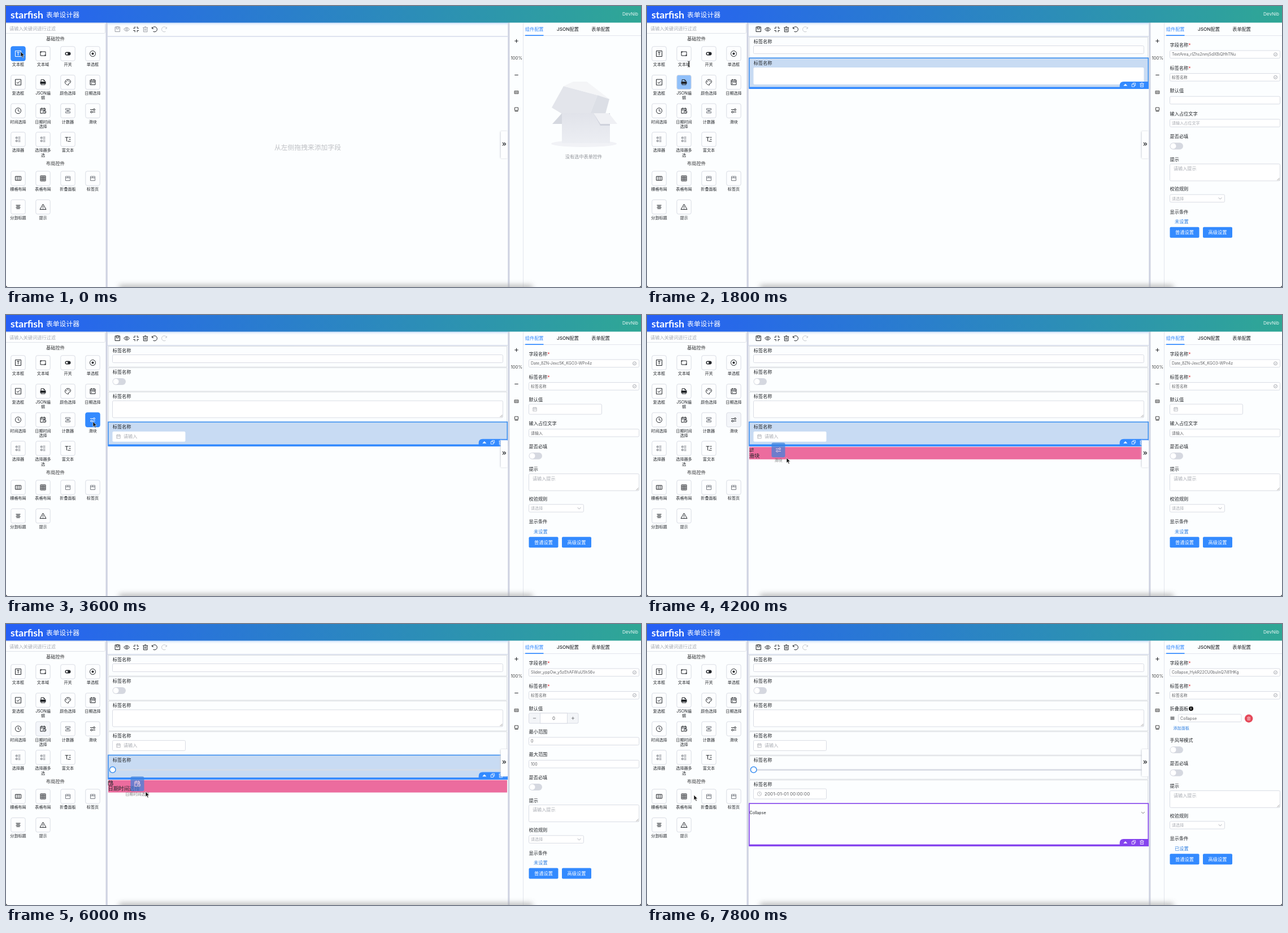
Write an HTML page that moves like this. It is 1124 px wide and 498 px high and loops after 8 s.

```html
<!DOCTYPE html>
<html lang="en">
<head>
<meta charset="utf-8">
<title>starfish</title>
<style>
html, body { margin: 0; width: 100%; height: 100%; overflow: hidden; background: #fcfeff; }
svg { display: block; }
text { font-family: Inter, "Noto Sans CJK SC", "Noto Sans CJK", sans-serif; white-space: pre; }
.brand { font-family: Lato, sans-serif; font-weight: 700; }
</style>
</head>
<body>
<svg id="stage" width="1124" height="498" viewBox="0 0 1124 498">
  <defs>
    <linearGradient id="head"><stop offset="0" stop-color="#265ff6"/><stop offset="1" stop-color="#2fa795"/></linearGradient>
    <linearGradient id="glow" x2="0" y2="1"><stop offset="0" stop-color="#bcd6f7"/><stop offset="1" stop-color="#fcfeff" stop-opacity="0"/></linearGradient>
    <linearGradient id="carton" x2="0" y2="1"><stop offset="0" stop-color="#e1e3ea"/><stop offset="1" stop-color="#eceef3"/></linearGradient>
    <filter id="blur" x="-10%" y="-300%" width="120%" height="700%"><feGaussianBlur stdDeviation="5"/></filter>
    <filter id="soft" x="-50%" width="200%"><feGaussianBlur stdDeviation="1.5"/></filter>
  </defs>
  <g id="base"></g>
  <g id="live"></g>
</svg>
<script>
const BLUE = '#338aff', PURPLE = '#8544ee', INK = '#222529', GREY = '#a8abb2', LINE = '#d9dce4';

// drawing helpers
const rect = (x, y, w, h, fill, stroke = 'none', r = 0, sw = 1, more = '') =>
  `<rect x="${x}" y="${y}" width="${w}" height="${h}" rx="${r}" fill="${fill}" stroke="${stroke}" stroke-width="${sw}" ${more}/>`;
const text = (x, y, s, size = 8.2, fill = INK, more = '') =>
  `<text x="${x}" y="${y + size * 0.37}" font-size="${size}" fill="${fill}" ${more}>${s}</text>`;
const mid = 'text-anchor="middle"', medium = 'font-weight="500"';
const path = (d, fill, stroke = 'none', sw = 1, more = '') =>
  `<path d="${d}" fill="${fill}" stroke="${stroke}" stroke-width="${sw}" ${more}/>`;
const circle = (x, y, r, fill, stroke = 'none', sw = 1) =>
  `<circle cx="${x}" cy="${y}" r="${r}" fill="${fill}" stroke="${stroke}" stroke-width="${sw}"/>`;
const ring = (x, y, r) => `M${x - r} ${y}a${r} ${r} 0 1 0 ${2 * r} 0a${r} ${r} 0 1 0 ${-2 * r} 0`;
const box = (x, y, w, h) => `M${x} ${y}h${w}v${h}h${-w}z`;

// icons around 0,0: [stroked path, filled path]
const list = [box(-4, -4, 2.5, 2.5) + box(-4, 1.5, 2.5, 2.5) + 'M0-4H4M0-1.5H4M0 1.5H4M0 4H4', ''];
const day = box(-4.5, -4, 9, 8.5) + 'M-4.5-1.5H4.5M-2-5.5V-3M2-5.5V-3';
const pane = 'M-4-3.5H4V4H-4zM-4-1H4M0-3.5V-1';
const icons = {
  input: [box(-5, -5, 10, 10) + 'M-2.5-2.5H2.5M0-2.5V3', ''],
  area: [box(-4.5, -3.5, 9, 7), box(-5, -4, 2, 2) + box(3, 2, 2, 2)],
  toggle: ['', 'M-2-3H2a3 3 0 0 1 0 6H-2a3 3 0 0 1 0-6z' + ring(-1.8, 0, 1.8)],
  radio: [ring(0, 0, 5), ring(0, 0, 2)],
  check: [box(-5, -5, 10, 10) + 'M-2.5 0L-.5 2L3-2', ''],
  json: ['M-3.5-1V-4.5H1.5L3.5-2V-1M-3.5 2V4.5H3.5V2', box(-5, -1.2, 10, 4) + 'M1-5L4-2H1z'],
  palette: ['M1 5C-2 5-5 3-5 0C-5-3-2-5 0-5C3-5 5-3 5-1C5 2 2 1 1.5 2.5Z', ring(-2.5, -1, .8) + ring(0, -3, .8) + ring(2.5, -1.5, .8)],
  date: [day, box(-3, 0, 1.5, 1) + box(-.5, 0, 1.5, 1) + box(2, 0, 1.5, 1) + box(-3, 2, 1.5, 1)],
  clock: [ring(0, 0, 5) + 'M0-3V0L2.5 1.5', ''],
  datetime: ['M0 4.5H-4.5V-4H4V-1M-4.5-1.5H4M-2-5.5V-3M2-5.5V-3M2.5 1V2.5H4' + ring(2.6, 2.2, 2.6), ''],
  counter: [box(-4, -4, 8, 2.5) + box(-4, 1.5, 8, 2.5) + 'M0-1.5V1.5M-2 0H2', ''],
  slider: ['M-4.5-2H1M4-2H4.5M-4.5 2.2H-3.5M0 2.2H4.5' + ring(2.5, -2, 1.5) + ring(-2, 2.2, 1.5), ''],
  select: list, multi: list,
  rich: ['M-5-3.5H1M-2-3.5V3.5M2-3.5H5M2 0H5M-.5 3.5H5', ''],
  grid: [box(-5, -3.5, 10, 7) + 'M-1.7-3.5V3.5M1.7-3.5V3.5', ''],
  table: [box(-4.5, -4.5, 9, 9) + 'M-1.5-4.5V4.5M1.5-4.5V4.5M-4.5-1.5H4.5M-4.5 1.5H4.5', ''],
  fold: [pane, ''], tabs: [pane, ''],
  split: ['M-4-3H4M-3-1H3M-4 1H4M-3 3H3', ''],
  warn: ['M0-5L5.5 4.5H-5.5zM0-1.5V1.5M0 2.6V3.6', ''],
  save: [box(-4.2, -4.2, 8.4, 8.4) + box(-2, -4.2, 4, 3.5), ''],
  eye: ['M-5 0Q0-6.5 5 0Q0 6.5-5 0z' + ring(0, 0, 1.6), ''],
  shrink: ['M-5-2H-2V-5M5-2H2V-5M-5 2H-2V5M5 2H2V5', ''],
  trash: ['M-4.5-3H4.5M-1.5-4.5H1.5M-3.3-3V4.5H3.3V-3M-1-1V2.5M1-1V2.5', ''],
  undo: ['M-4.5-4V-1.2H-1.7M-4.3-1.5A4.5 4.5 0 1 1-2.5 3.8', ''],
  redo: ['M4.5-4V-1.2H1.7M4.3-1.5A4.5 4.5 0 1 0 2.5 3.8', ''],
  copy: ['M-1.5-1.5V-4H4V1.5H1.5' + box(-4, -1.5, 5.5, 5.5), ''],
  up: ['', 'M-4 2L0-2L4 2z'], down: ['', 'M-4-2L0 2L4-2z'],
  keys: [box(-3.5, -2.5, 7, 5) + 'M-3.5-.8H3.5M-3.5 .9H3.5', ''],
  screen: [box(-3, -3, 6, 5) + 'M-3 3.5H3', ''],
  chevron: ['M-2.8-1.4L0 1.4L2.8-1.4', ''],
  tick: [ring(0, 0, 3) + 'M-1.4 0L-.3 1L1.5-.9', ''],
  plus: ['M-3.2 0H3.2M0-3.2V3.2', ''], minus: ['M-3.2 0H3.2', '']
};
const icon = (name, x, y, color = INK, k = 1) => {
  const [line, solid] = icons[name];
  return `<g transform="translate(${x} ${y}) scale(${k})">` +
    path(line, 'none', color, 1) + path(solid, color, 'none', 0, 'fill-rule="evenodd"') + '</g>';
};

// palette tiles
const groups = [
  [84.5, [['input', '文本框'], ['area', '文本域'], ['toggle', '开关'], ['radio', '单选框'],
    ['check', '复选框'], ['json', 'JSON编', '辑'], ['palette', '颜色选择'], ['date', '日期选择'],
    ['clock', '时间选择'], ['datetime', '日期时间', '选择'], ['counter', '计数器'], ['slider', '滑块'],
    ['select', '选择器'], ['multi', '选择器多', '选'], ['rich', '富文本']]],
  [305.5, [['grid', '栅格布局'], ['table', '表格布局'], ['fold', '折叠面板'], ['tabs', '标签页'],
    ['split', '分割标题'], ['warn', '提示']]]
];
const pale = ['counter', 'select', 'multi', 'fold', 'tabs'];
const names = {};
const tiles = (hot, fill) => groups.map(([top, items]) => items.map(([key, ...label], i) => {
  names[key] = label.join('');
  const x = 21.5 + i % 4 * 44, y = top + Math.floor(i / 4) * 50.6, on = key === hot;
  const strong = on && fill === BLUE;
  return rect(x - 12.7, y - 12.7, 25.4, 25.4, on ? fill : '#fdfeff', strong ? BLUE : LINE, 3) +
    icon(key, x, y, strong ? '#fff' : pale.includes(key) ? '#777b82' : INK) +
    label.map((s, n) => text(x, y + 19.2 + n * 8.5, s, 7.1, INK, mid)).join('');
}).join('')).join('');

// property panel
const input = (y, s, tick, color = '#606266') => rect(925.5, y - 6.8, 195, 13.6, '#fff', LINE, 2) +
  text(929, y, s, 6.95, color) + (tick ? icon('tick', 1112.5, y, GREY) : '');
const toggle = (x, y, white) => rect(x, y - 6, 23.5, 12, white ? '#cdd6e4' : '#d5d8e0', 'none', 6) + circle(x + 6, y, 5, '#fff');
const area = (x, y, w, h, edge = LINE) => rect(x, y, w, h, '#fff', edge, 2) +
  path(`M${x + w - 5} ${y + h - 1}l4-4M${x + w - 2.5} ${y + h - 1}l1.5-1.5`, 'none', '#777', .7);
const picker = (x, y, s, key, edge = LINE) => rect(x, y - 9, 129, 18, '#fff', edge, 2) +
  icon(key, x + 10.5, y, GREY, .72) + text(x + 19.5, y, s, 8.1, s[0] === '2' ? '#606266' : GREY);
const button = (x, y, s) => rect(x, y - 9.5, 52, 19, BLUE, 'none', 2) + text(x + 26, y, s, 8.2, '#fff', mid);

const fields = {
  input: [40.5, (y, s) => input(y + 17, s)],
  id: [40.5, (y, s) => input(y + 16.8, s, true)],
  toggle: [40.9, y => toggle(925.5, y + 17.3)],
  area: [52.3, y => area(925.5, y + 8, 195, 30) + text(932, y + 16.5, '请输入提示', 8.1, GREY)],
  select: [40.7, y => rect(925.5, y + 10, 97, 13.5, '#fff', LINE, 2) + text(929, y + 16.8, '请选择', 7.1, GREY) +
    icon('chevron', 1014.5, y + 16.8, GREY)],
  link: [0, (y, s) => text(934, y + 17.5, s, 8.2, '#2f7fe0') + button(925.5, y + 36.3, '普通设置') + button(984, y + 36.3, '高级设置')],
  date: [42, (y, s) => picker(925.5, y + 17, s, 'date')],
  clock: [42, (y, s) => picker(925.5, y + 17, s, 'clock')],
  number: [40.7, y => rect(925.5, y + 8, 87.5, 18, '#f3f5f8', LINE, 2) + rect(945.5, y + 8, 48, 18, '#fff', LINE) +
    icon('minus', 935.5, y + 17, '#606266', .8) + icon('plus', 1003.5, y + 17, '#606266', .8) + text(969.5, y + 17, '0', 8, '#606266', mid)],
  panes: [55.6, y => circle(963, y, 4, '#111') + text(963, y, 'i', 6.5, '#fff', mid + ' font-weight="700"') +
    path(`M926.5 ${y + 15}h7m-7 2h7m-7 2h7`, 'none', INK) + rect(940.5, y + 10, 111.5, 13.5, '#fff', LINE, 2) +
    text(944, y + 17, 'Collapse', 7.1, '#606266') + circle(1065.2, y + 17.5, 7.2, '#e5495a') +
    icon('trash', 1065.2, y + 17.5, '#fff', .62) + text(931.5, y + 34.3, '添加面板', 7.1, '#2f7fe0')]
};
const hint = '输入占位文字', plain = [['默认值', 'input', ''], [hint, 'input', '']];
const panels = {
  input: ['Input_k3VqLw8ZtyRbn5XcPdMa0', plain],
  area: ['TextArea_rIZhs2nmjSdXBiQHhTNu', plain],
  toggle: ['Switch_AHRyZ0pl7eg3_Lnnco-L1', [['默认值', 'toggle']]],
  date: ['Date_8ZN-Jexc5K_KGO3-WPn4z', [['默认值', 'date', ''], [hint, 'input', '请输入']]],
  slider: ['Slider_yppOw_y5zEhAFWuU5hS6v', [['默认值', 'number'], ['最小范围', 'input', '0'], ['最大范围', 'input', '100']]],
  datetime: ['DateTime_s_a1pMvGQvx5dWZTmHVUF', [['默认值', 'clock', '2001-01-01 00:00:00'], [hint, 'input', '1']]],
  fold: ['Collapse_HykR22CU0buInQ7i81HKg', [['折叠面板', 'panes'], ['手风琴模式', 'toggle']]]
};
const panel = key => {
  const [id, own] = panels[key];
  let y = 69;
  return [['字段名称', 'id', id], ['标签名称', 'id', '标签名称'], ...own, ['是否必填', 'toggle'], ['提示', 'area'],
    ['校验规则', 'select'], ['显示条件', 'link', key === 'fold' ? '已设置' : '未设置']].map(([label, kind, value]) => {
    const [step, draw] = fields[kind];
    const star = kind === 'id' ? '<tspan fill="#e5393f">*</tspan>' : '';
    const out = text(925.5, y, label + star, 8.2, INK, medium) +
      draw(y, value || '') + (value === '' && label === hint ? text(929, y + 17, '请输入占位文字', 7.1, GREY) : '');
    y += step;
    return out;
  }).join('');
};
const empty = () => `<ellipse cx="1023" cy="244" rx="58" ry="6" fill="#f1f2f6"/>` +
  path('M966 180L987 142L1047 158L1034 191H984z', '#e3e5eb') +
  path('M987 142L1004 134L1028 134L1068 165L1047 158z', '#f4f5f7') +
  path('M1047 158L1068 165L1061 191H1034z', '#dcdfe6') +
  path('M984 190H1069V243H984z', 'url(#carton)') +
  path('M984 190L967 209H984z', '#d5d8e0') + path('M1040 190H1069V212H1052z', '#cfd2dc') +
  path('M1040 190H1067L1082 209H1052z', '#eff0f4') +
  text(1022.5, 266.5, '没有选中表单控件', 8.2, '#909399', mid);

// form rows: [height, body]
const rows = {
  input: [38, (y, e) => rect(188.5, y + 15.5, 691, 14, '#fff', e, 2)],
  toggle: [43, (y, e) => toggle(188.5, y + 25, e === 'none')],
  area: [54.4, (y, e) => e === 'none' ? rect(188.5, y + 16, 691, 30, '#fff', e, 2) : area(188.5, y + 16, 691, 30)],
  date: [42.8, (y, e) => picker(188.5, y + 25, '请输入', 'date', e)],
  slider: [42.8, (y, e) => rect(188.5, y + 23.7, 691, 3, e === 'none' ? '#d3dcea' : '#dbdee6', 'none', 1.5) +
    circle(188.7, y + 25, 5.3, '#fff', '#3b8ff0', 1.5)],
  datetime: [42.9, (y, e) => picker(188.5, y + 25, '2001-01-01 00:00:00', 'clock', e)],
  fold: [75.6, y => text(181.5, y + 15, 'Collapse', 7.1) + icon('chevron', 878, y + 15.5, '#777')]
};
const dropMark = (y, key) => rect(181, y + .6, 706, 22, '#ec6c9e') + icon(key, 185, y + 6, INK, .85) +
  text(180.5, y + 16, names[key], 9.4);
const tools = (y, color, first, last, from = 181) => {
  const keys = [...(first ? [] : ['up']), ...(last ? [] : ['down']), 'copy', 'trash'];
  const x = 888 - keys.length * 14.6 - 7.5;
  return path(`M${x} ${y}v-6q0-7 7-7H888v13z`, color) + rect(from, y - 3.5, 888 - from, 3.5, color) +
    keys.map((k, i) => icon(k, 876 - (keys.length - 1 - i) * 14.6, y - 7.2, '#fff', k === 'copy' || k === 'trash' ? .8 : .9)).join('');
};
const form = s => {
  let y = 55, over = '';
  const kinds = s.rows.filter(k => k !== 'drop');
  const out = s.rows.map(kind => {
    if (kind === 'drop') {
      const mark = dropMark(y, s.drag);
      y += 22.6;
      return mark;
    }
    const [h, body] = rows[kind], on = kind === s.pick, i = kinds.indexOf(kind);
    const color = kind === 'fold' ? PURPLE : BLUE;
    let row = on ? rect(181, y - .8, 706.3, h - .6, kind === 'fold' ? '#fdfeff' : '#c8dbf3', color === BLUE ? '#3b8ff0' : color, 0, 1.6)
      : rect(181.5, y + .5, 705, h - 1.5, 'none', '#b9bcc4', 0, 1, 'stroke-dasharray="1 1"');
    if (kind !== 'fold') row += text(188.8, y + 8, '标签名称');
    row += body(y, on ? 'none' : LINE);
    if (on) over += tools(y + h - .4, color, !i, i === kinds.length - 1, s.bar);
    if (s.oldBar && kind === 'slider') over += rect(s.oldBar, y + h - 4, 887 - s.oldBar, 2.6, '#3f84d8');
    y += h;
    return row;
  }).join('');
  return out + over;
};

const pointer = (x, y) => path(`M${x} ${y}v9.2l2.1-1.9l1.6 3.6l1.5-.7l-1.6-3.5h2.9z`, '#111', '#fff', .6);
const beam = (x, y) => path(`M${x - 2} ${y - 5}q2 0 2 1v8q0 1-2 1M${x + 2} ${y - 5}q-2 0-2 1v8q0 1 2 1`, 'none', '#222', .9);
const ghost = (x, y, key) => `<g opacity=".72">` + rect(x - 12, y - 13, 24, 26, '#3f83df', 'none', 3) + icon(key, x, y, '#fff') +
  text(x, y + 18.5, names[key], 7.1, '#555', mid) + '</g>';

// one scene each 600 ms
const all = ['input', 'toggle', 'area', 'date', 'slider', 'datetime', 'fold'];
const HOVER = '#f4f6fa';
const scenes = [
  { rows: [], hot: 'input', at: [26, 81] },
  { rows: ['input'], pick: 'input', hot: 'area', at: [67, 87] },
  { rows: ['input', 'drop'], pick: 'input', hot: 'area', fill: HOVER, drag: 'area', at: [247, 114] },
  { rows: ['input', 'area'], pick: 'area', hot: 'json', fill: '#90c0fa', at: [74, 103], beam: true },
  { rows: ['input', 'drop', 'area'], pick: 'area', hot: 'toggle', fill: HOVER, drag: 'toggle', at: [247, 112] },
  { rows: all.slice(0, 3), pick: 'toggle', hot: 'date', fill: HOVER, at: [151, 143] },
  { rows: all.slice(0, 4), pick: 'date', hot: 'slider', at: [154, 189] },
  { rows: [...all.slice(0, 4), 'drop'], pick: 'date', hot: 'slider', fill: HOVER, drag: 'slider', at: [247, 253] },
  { rows: all.slice(0, 5), pick: 'slider', hot: 'rich', at: [93.5, 238] },
  { rows: all.slice(0, 5), pick: 'slider', hot: 'datetime', at: [68, 189] },
  { rows: [...all.slice(0, 5), 'drop'], pick: 'slider', hot: 'datetime', fill: HOVER, drag: 'datetime', at: [247, 297] },
  { rows: all.slice(0, 6), pick: 'datetime', bar: 807, oldBar: 261, at: [135, 320] },
  { rows: [...all.slice(0, 6), 'drop'], pick: 'datetime', hot: 'fold', fill: HOVER, drag: 'fold', at: [247, 340] },
  { rows: all, pick: 'fold', at: [83, 303] }
];

const base = () => rect(0, 0, 1124, 498, '#fcfeff') +
  rect(176.5, 29, 3.3, 469, '#cfd3e2') + rect(888.3, 29, 3.2, 469, '#cfd3e2') +
  rect(180, 29, 708, 7, 'url(#glow)') +
  rect(0, 0, 1124, 29.5, 'url(#head)') +
  text(8, 15, 'starfish', 17.6, '#fff', 'class="brand"') + text(71, 15.8, '表单设计器', 11.8, '#fff', medium) +
  text(1119, 14.5, 'DevNib', 8.1, '#e6f6f4', 'text-anchor="end"') +
  rect(-2, 30.5, 177.5, 18, '#fdfeff', '#dfe2e9', 2) + text(6, 39.7, '请输入关键词进行过滤', 8.2, GREY) +
  text(87.5, 58.3, '基础控件', 8.2, '#303133', mid) + text(87.5, 279, '布局控件', 8.2, '#303133', mid) +
  rect(180, 53.3, 708, 1.2, '#cbd3e6') +
  icon('plus', 903.5, 62) + text(903.8, 92, '100%', 7.8, '#444', mid) + icon('minus', 903.5, 122.3) +
  icon('keys', 903.5, 153, '#666') + icon('screen', 903.5, 183, '#444') +
  rect(915, 30, 1, 468, '#e2e5ec') + rect(915, 52, 209, 1, '#e2e5ec') + rect(919, 51.3, 32.5, 1.7, BLUE) +
  text(918.8, 41.3, '组件配置', 8.2, BLUE, medium) + text(975, 41.3, 'JSON配置', 8.2, INK, medium) +
  text(1036.3, 41.3, '表单配置', 8.2, INK, medium) +
  rect(200, 494, 732, 12, '#aaa', 'none', 4, 0, 'filter="url(#blur)" opacity=".75"');

const draw = s => {
  const filled = s.rows.length > 0, [x, y] = s.at;
  const bar = [['save', 197.3, filled], ['eye', 213.6, filled], ['shrink', 230.2, true], ['trash', 246.7, filled],
    ['undo', 263, true], ['redo', 280, false]];
  return tiles(s.hot, s.fill || BLUE) +
    bar.map(([k, bx, on]) => icon(k, bx, 41.3, on ? INK : k === 'redo' ? '#c5c8ce' : '#9a9da4')).join('') +
    (filled ? form(s) + panel(s.pick) : empty() + text(534, 251, '从左侧拖拽来添加字段', 11.8, '#bfc1c5', mid)) +
    rect(875, 222, 13, 48, '#cfd2da', 'none', 2, 0, 'filter="url(#soft)"') + rect(876, 222, 12, 48, '#fdfeff', 'none', 1) +
    path('M879 242l2.5 2.7l-2.5 2.7M882 242l2.5 2.7l-2.5 2.7', 'none', INK, 1.2) +
    (s.drag ? ghost(x - 14.5, y - 13.8, s.drag) : '') + (s.beam ? beam(x, y) : pointer(x, y)) +
    path('M0 494.5Q0 498 3.5 498H0zM1124 494.5Q1124 498 1120.5 498H1124z', '#000');
};

document.getElementById('base').innerHTML = base();
const live = document.getElementById('live');
let shown = -1;
const tick = () => {
  const now = Math.floor(performance.now() % 8000 / 600);
  if (now !== shown) live.innerHTML = draw(scenes[shown = now]);
  requestAnimationFrame(tick);
};
tick();
</script>
</body>
</html>
```
